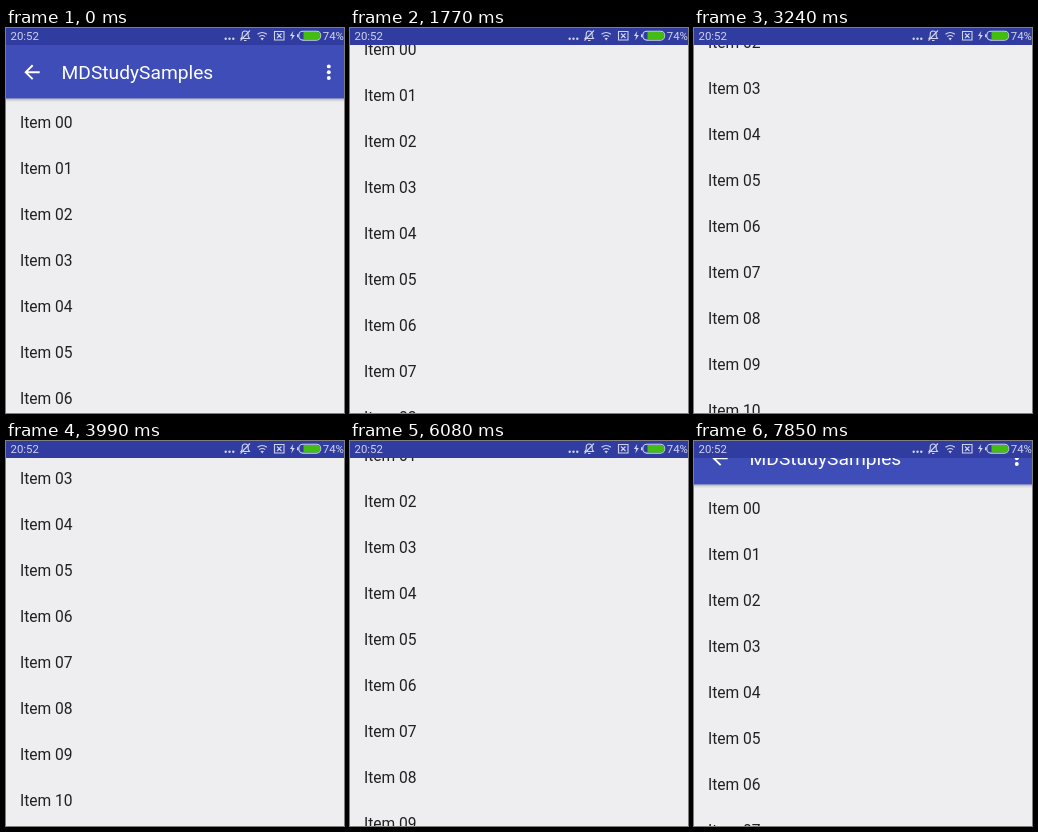
Write an HTML page that moves like this. It is 338 px wide and 385 px high and loops after 8000 ms.

```html
<!DOCTYPE html>
<html lang="en">
<head>
<meta charset="utf-8">
<title>Scrolling list</title>
<style>
  html, body { margin: 0; width: 100%; height: 100%; overflow: hidden; background: #eeeef0; }
  svg { display: block; }
  text { font-family: Roboto, sans-serif; }
  #list { font-size: 15.6px; fill: #212123; }
  #status { font-size: 11.4px; fill: #cfd3ec; }
  .line { fill: none; stroke: #cfd3ec; stroke-width: 1.1; }
</style>
</head>
<body>
<svg width="338" height="385" viewBox="0 0 338 385">
  <defs>
    <linearGradient id="shade" x2="0" y2="1">
      <stop offset="0" stop-opacity=".28"/>
      <stop offset=".4" stop-opacity=".1"/>
      <stop offset="1" stop-opacity="0"/>
    </linearGradient>
  </defs>
  <rect width="338" height="385" fill="#eeeef0"/>
  <g id="list"></g>
  <g id="bar" fill="#fff">
    <rect y="70.5" width="338" height="4" fill="url(#shade)"/>
    <rect y="16" width="338" height="54.5" fill="#3e4db8"/>
    <path transform="translate(14.5 32.7) scale(.958)"
      d="M20 11H7.83l5.59-5.59L12 4l-8 8 8 8 1.41-1.41L7.83 13H20z"/>
    <text x="55.6" y="51.2" font-size="19.2">MDStudySamples</text>
    <circle cx="322.8" cy="38.4" r="1.95"/>
    <circle cx="322.8" cy="44.2" r="1.95"/>
    <circle cx="322.8" cy="50" r="1.95"/>
  </g>
  <g id="status">
    <rect width="338" height="17" fill="#303c9f"/>
    <text x="4.5" y="12">20:52</text>
    <circle cx="219.7" cy="10.8" r="1.2"/>
    <circle cx="223.5" cy="10.8" r="1.2"/>
    <circle cx="227.3" cy="10.8" r="1.2"/>
    <!-- muted bell -->
    <path class="line" d="M235 10.5h8.5l-1.3-2V6a3 3 0 0 0-6 0v2.5zM238 12.5h2.5M234.5 12.5l9.5-10"/>
    <!-- wifi -->
    <path class="line" d="M251.5 6.3q4.7-3.6 9.4 0M253.2 8.6q3-2.3 6 0"/>
    <path d="M254.5 10.2q1.7-1.1 3.4 0l-1.7 2.2z"/>
    <!-- no SIM -->
    <path class="line" d="M268.5 3.5h9.5v8.5h-9.5zM271 5.5l4.5 4.5M275.5 5.5l-4.5 4.5"/>
    <path d="M287.3 3l-3.4 5h2.3l-1 4.5 3.6-5.4h-2.3z"/>
    <!-- battery -->
    <rect class="line" x="292.8" y="3.3" width="21.8" height="8.8" rx="4"/>
    <path d="M297.5 4h13.3a3.7 3.7 0 0 1 0 7.4h-13.3z" fill="#43bd12"/>
    <path d="M291 6.2h1.5v3H291z"/>
    <text x="316.8" y="12">74%</text>
  </g>
</svg>
<script>
const LOOP = 8000, STEP = 147, BACK = 5490, BAR = 54;
const list = document.getElementById('list'), bar = document.getElementById('bar');

for (let i = 0; i < 12; i++) {
  const row = document.createElementNS('http://www.w3.org/2000/svg', 'text');
  row.setAttribute('x', 13.9);
  row.setAttribute('y', 99.6 + 46 * i);
  row.textContent = 'Item ' + String(i).padStart(2, '0');
  list.append(row);
}

// Knots: [step, scroll offset, speed per step]
const down = [[0, 0, 5], [7, 52, 2], [8, 53.5, 2], [17, 116, 9.5], [24, 187, 5], [27, 195, 0]];
const up = [[0, 195, -13], [5, 126, -10.5], [13, 64, -8.5], [17, 27, -9.5]];

// Cubic Hermite curve through the knots, held at the last one
function curve(knots, k) {
  const n = knots.findIndex(p => p[0] > k);
  if (n < 0) return knots.at(-1)[1];
  const [x0, y0, v0] = knots[n - 1], [x1, y1, v1] = knots[n];
  const w = x1 - x0, u = (k - x0) / w, r = 1 - u;
  return y0 * (1 + 2 * u) * r * r + v0 * w * u * r * r
       + y1 * u * u * (3 - 2 * u) - v1 * w * u * u * r;
}

function scrollAt(t) {
  return t < BACK
    ? curve(down, Math.floor(t / STEP))
    : curve(up, Math.floor((t - BACK) / STEP) + 1);
}

const start = performance.now();
function draw(now) {
  const s = Math.round(scrollAt(Math.max(0, now - start) % LOOP));
  list.setAttribute('transform', `translate(0 ${-s})`);
  bar.setAttribute('transform', `translate(0 ${-s})`);
  bar.setAttribute('visibility', s < BAR ? 'visible' : 'hidden');
  requestAnimationFrame(draw);
}
draw(start);
</script>
</body>
</html>
```
